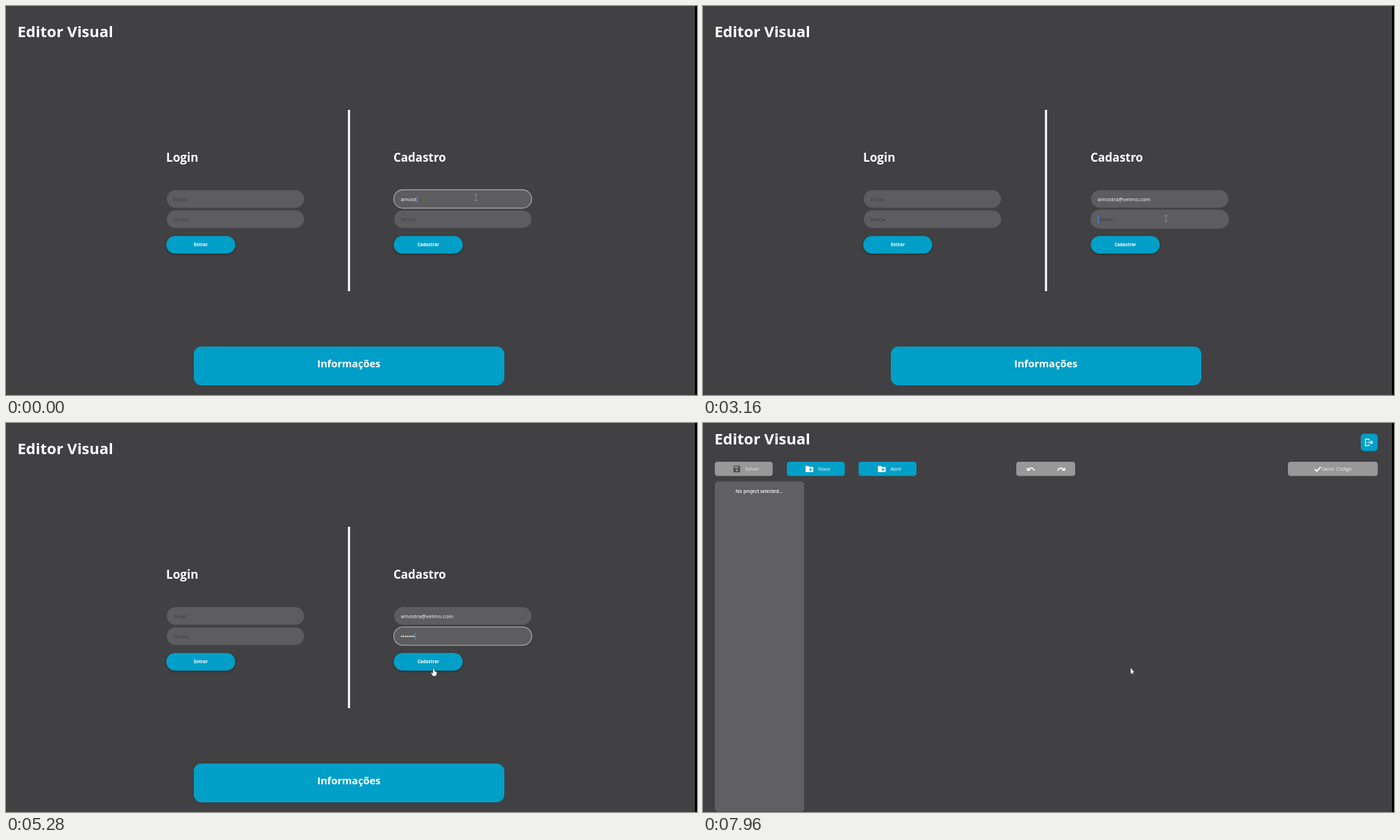
An HTML page with a canvas that plays this animation: 997 px wide and 562 px high, repeating every 8 s.

```html
<!DOCTYPE html>
<html lang="pt">
<head>
<meta charset="utf-8">
<title>Editor Visual</title>
<style>
html, body { margin: 0; width: 100%; height: 100%; overflow: hidden; background: #414042; }
canvas { display: block; width: 997px; height: 562px; }
</style>
</head>
<body>
<canvas id="stage" width="997" height="562"></canvas>
<script>
const ctx = document.getElementById('stage').getContext('2d');
const LOOP = 8000, SWITCH = 7960;
const BG = '#414042', FIELD = '#5d5c5e', BLUE = '#009fc8', GREY = '#999899';
const FACE = '"Open Sans", "Noto Sans", sans-serif';
const EMAIL = 'amostra@velmo.com', TYPED_AT_START = 5;

// key presses, in ms
const emailKeys = [40, 160, 320, 1000, 1160, 1320, 1440, 1560, 1720, 1880, 2040, 2200];
const passKeys = [3840, 3880, 3920, 3960, 4000, 4040, 4080];
const FOCUS_PASS = 3120;

// pointer: time, x, y
const path = [
  [0, 678, 277], [2580, 678, 277], [2880, 668, 307], [4120, 668, 307],
  [4440, 617, 355], [6260, 617, 355], [6340, 619, 354],
  [6900, 619, 354], [6940, 618, 355], [7080, 618, 355], [7200, 617, 355]
];

const clamp = v => Math.max(0, Math.min(1, v));
const ease = v => v * v * (3 - 2 * v);
const pressed = (keys, t) => keys.filter(k => k <= t).length;

function pointerAt(t) {
  let i = path.length - 1;
  while (path[i][0] > t) i--;
  const a = path[i], b = path[i + 1] || a;
  const k = b === a ? 0 : ease((t - a[0]) / (b[0] - a[0]));
  return [a[1] + (b[1] - a[1]) * k, a[2] + (b[2] - a[2]) * k];
}

// the blink restarts with every key press
function caretOn(t, start, keys) {
  const last = keys.filter(k => k <= t).pop() ?? start;
  return Math.floor((t - last) / 505) % 2 === 0;
}

function box(x, y, w, h, r, fill) {
  ctx.beginPath();
  ctx.roundRect(x, y, w, h, r);
  ctx.fillStyle = fill;
  ctx.fill();
}

function text(s, x, y, size, weight = 400, color = '#fff', align = 'left') {
  ctx.font = `${weight} ${size}px ${FACE}`;
  ctx.textAlign = align;
  ctx.fillStyle = color;
  ctx.fillText(s, x, y);
  return ctx.measureText(s).width;
}

function shape(points, fill) {
  ctx.beginPath();
  points.forEach(([x, y]) => ctx.lineTo(x, y));
  ctx.closePath();
  ctx.fillStyle = fill;
  ctx.fill();
}

function line(points, color, width) {
  ctx.beginPath();
  points.forEach(([x, y]) => ctx.lineTo(x, y));
  ctx.strokeStyle = color;
  ctx.lineWidth = width;
  ctx.stroke();
}

function shadowed(draw) {
  ctx.save();
  ctx.shadowColor = 'rgba(0,0,0,.4)';
  ctx.shadowBlur = 3;
  ctx.shadowOffsetY = 1;
  draw();
  ctx.restore();
}

function field(x, y, focus = 0) {
  box(x - focus, y - focus, 198 + 2 * focus, 25.5 + 2 * focus, 13 + focus, FIELD);
  if (!focus) return;
  ctx.strokeStyle = `rgba(160,160,160,${focus})`;
  ctx.lineWidth = 1.3;
  ctx.beginPath();
  ctx.roundRect(x - .5, y - .5, 199, 26.5, 13.2);
  ctx.stroke();
}

const hint = (s, x, y) => text(s, x, y, 7.5, 400, '#3f3e40');

function caret(x, y) {
  ctx.fillStyle = '#4a82dc';
  ctx.fillRect(x, y, 1.5, 10);
}

function pill(label, x) {
  shadowed(() => box(x, 332.3, 99.5, 25.4, 12.7, BLUE));
  text(label, x + 49.8, 347.4, 6.4, 700, '#fff', 'center');
}

function beam(x, y) {
  line([[x, y - 4], [x, y + 4]], '#858486', 1);
  for (const dy of [-4, 4]) line([[x - 1.7, y + dy], [x + 1.7, y + dy]], '#a2a1a3', 1);
}

function arrow(x, y) {
  shape([[x, y], [x, y + 8], [x + 1.8, y + 6.4], [x + 3, y + 9], [x + 4, y + 8.4],
    [x + 3, y + 6], [x + 5, y + 5.7]], '#fff');
}

function hand(x, y) {
  const p = [[-.8, 0], [.8, 0], [1, 3.4], [4, 4.4], [4.6, 5.4], [4, 8.6], [3, 10.6],
    [-1, 10.6], [-3.6, 6.6], [-2.8, 5.6], [-.9, 7]].map(([a, b]) => [x + a, y + b]);
  ctx.lineJoin = 'round';
  line([...p, p[0]], '#26323a', 1.2);
  shape(p, '#fff');
}

function pointer(t) {
  const [x, y] = pointerAt(t);
  if (y < 322) beam(x, y);
  else if (y < 332.3) arrow(x, y);
  else hand(x, y);
}

function loginScreen(t) {
  text('Editor Visual', 16.5, 44.8, 22, 700);
  text('Login', 231, 224.6, 17.2, 700);
  text('Cadastro', 559, 224.6, 17, 700);
  ctx.fillStyle = '#fff';
  ctx.fillRect(493.4, 150, 3, 262);

  field(232, 266);
  field(232, 295.2);
  hint('Email', 241.5, 281.6);
  hint('Senha', 241.5, 310.8);
  pill('Entrar', 231.2);

  const onPass = t >= FOCUS_PASS;
  field(560, 266, onPass ? 0 : 1);
  field(560, 295.2, clamp((t - FOCUS_PASS) / 200));
  const shown = EMAIL.slice(0, TYPED_AT_START + pressed(emailKeys, t));
  const w = text(shown, 569.5, 281.6, 7.7);
  const dots = pressed(passKeys, t);
  if (!dots) hint('Senha', 569.5, 310.8);
  for (let i = 0; i < dots; i++) box(570 + i * 2.9, 307.3, 2, 2, 1, '#fff');

  if (!onPass) {
    if (caretOn(t, 0, emailKeys)) caret(570 + w, 274);
  } else if (caretOn(t, FOCUS_PASS, passKeys)) {
    caret(569.5 + dots * 2.9, 303.3);
  }
  pill('Cadastrar', 559.5);

  box(271, 492, 448, 56, 11, BLUE);
  text('Informações', 494.7, 521.6, 14.6, 700, '#fff', 'center');
  pointer(t);
}

function folder(x, y) {
  shape([[x, y], [x + 4, y], [x + 5.3, y + 1.5], [x + 11, y + 1.5], [x + 11, y + 9], [x, y + 9]], '#fff');
  line([[x + 5, y + 5.3], [x + 9.4, y + 5.3]], BLUE, 1.2);
  line([[x + 7.2, y + 3.1], [x + 7.2, y + 7.5]], BLUE, 1.2);
}

// curved arrow; dir 1 points left, -1 right
function turn(x, y, dir) {
  ctx.save();
  ctx.translate(x, y);
  ctx.scale(dir, 1);
  ctx.beginPath();
  ctx.moveTo(-3.5, .5);
  ctx.quadraticCurveTo(2.5, -4, 5.3, 2.5);
  ctx.strokeStyle = '#fff';
  ctx.lineWidth = 1.6;
  ctx.stroke();
  shape([[-5.5, -2.5], [-5.5, 2.5], [-.5, 2.5]], '#fff');
  ctx.restore();
}

function editorScreen() {
  text('Editor Visual', 16.5, 30.8, 22, 700);

  box(949, 15.5, 24.5, 25, 5, BLUE);
  line([[961, 25.2], [961, 23.3], [955.8, 23.3], [955.8, 32.7], [961, 32.7], [961, 30.8]], '#fff', 1.3);
  line([[958.5, 28], [965, 28]], '#fff', 1.3);
  line([[963.5, 25.5], [966, 28], [963.5, 30.5]], '#fff', 1.3);

  box(17, 56, 83.5, 20.5, 4, GREY);
  box(121, 56, 83.5, 20.5, 4, BLUE);
  box(224.5, 56, 83.5, 20.5, 4, BLUE);
  box(452, 56, 85, 20.5, 4, GREY);
  box(844, 56, 129.5, 20.5, 4, GREY);

  box(44, 61.7, 9.5, 9.5, 1, '#4c4b4d');
  ctx.fillStyle = GREY;
  ctx.fillRect(45.3, 63, 5.6, 2.2);
  box(47.2, 66.6, 3.2, 3.2, 1.6, GREY);
  folder(148, 62);
  folder(252.5, 62);
  text('Salvar', 61, 69.2, 7, 400, '#e6e6e6');
  text('Novo', 166, 69.2, 7.2);
  text('Abrir', 270.5, 69.2, 7);
  turn(473, 66.5, 1);
  turn(517, 66.5, -1);
  line([[882.8, 66.8], [885.6, 69.6], [891.2, 63.6]], '#fff', 1.8);
  text('Gerar Código', 893, 69.2, 7, 400, '#f0f0f0');

  box(17, 84.5, 129, 477, 5, '#605f61');
  text('No project selected...', 81, 100.5, 6.7, 600, '#fff', 'center');
  arrow(617, 354);
}

function frame(now) {
  const t = now % LOOP;
  ctx.fillStyle = BG;
  ctx.fillRect(0, 0, 997, 562);
  if (t < SWITCH) loginScreen(t);
  else editorScreen();
  ctx.fillStyle = '#000';
  ctx.fillRect(994, 0, 3, 562);
}

const start = performance.now();
function tick() {
  frame(performance.now() - start);
  requestAnimationFrame(tick);
}
tick();
</script>
</body>
</html>
```
